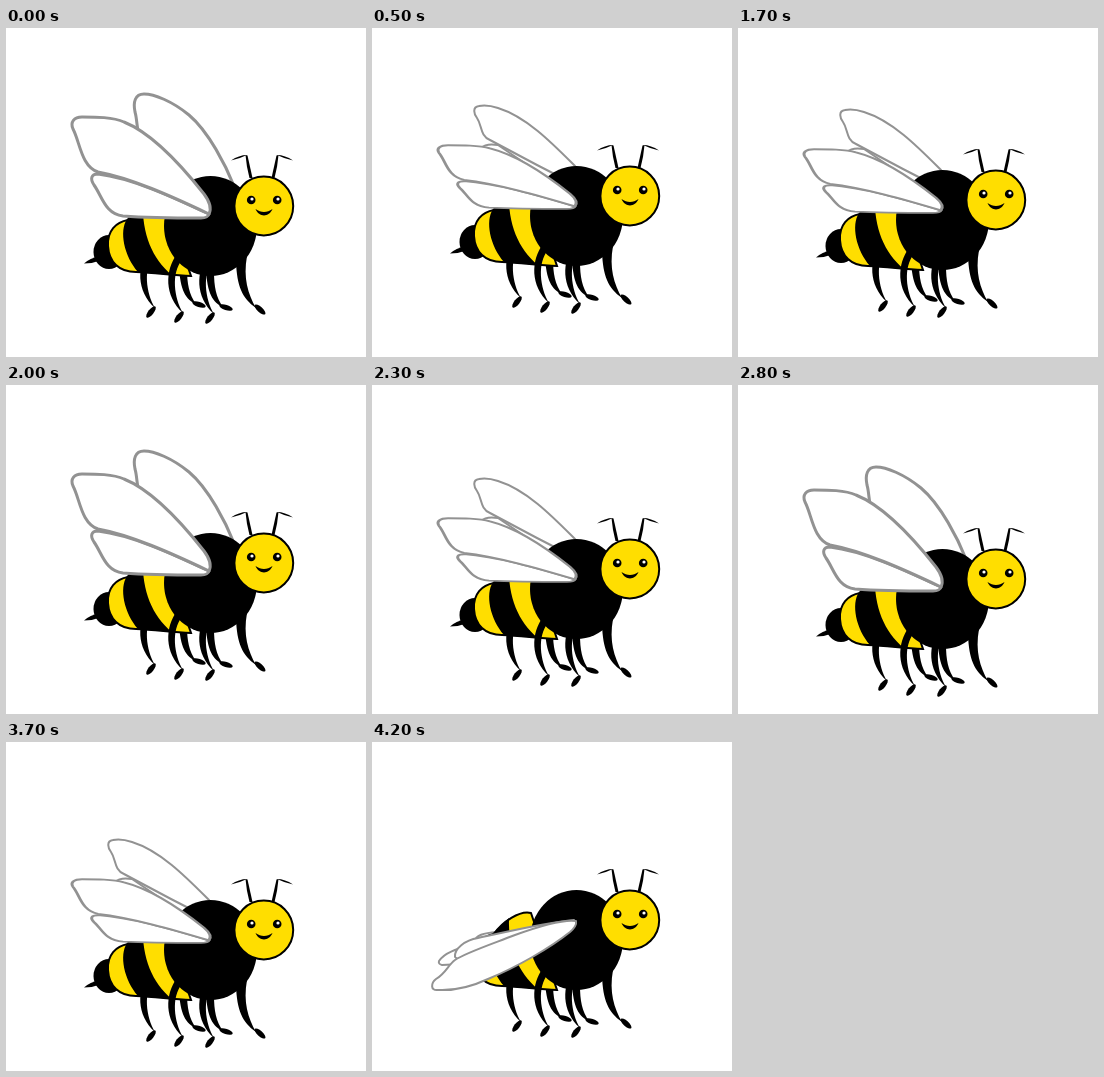
These frames come from a looping animation (360 px wide and 329 px high, 4300 ms). An HTML page without scripts:

```html
<!DOCTYPE html>
<html lang="en">
<head>
<meta charset="utf-8">
<title>Flying bee</title>
<style>
  @property --tick { syntax: "<number>"; inherits: true; initial-value: 0; }

  html, body { margin: 0; width: 100%; height: 100%; overflow: hidden; background: #fff; }
  svg {
    display: block; width: 360px; height: 329px; overflow: hidden;
    animation: count 4.3s steps(43) -1ms infinite;
  }
  @keyframes count { to { --tick: 43; } }

  /* Rise for 10 ticks, sink for 21, rise again: 2px per tick. */
  .bee {
    --y: min(2 * max(10 - var(--tick), var(--tick) - 10) - 20, 84 - 2 * var(--tick));
    transform: translateY(calc(1px * var(--y)));
  }
  /* Raised, level and lowered poses sit 400px apart; the beat lasts 4 ticks. */
  .flap { transform: translateX(calc(400px * (cos(90deg * var(--tick)) - 1))); }

  .yellow { fill: #ffde00; stroke: #000; stroke-width: 2; }
  .wing { fill: #fff; stroke: #929292; stroke-width: 3; stroke-linejoin: round; }
  .thin { stroke-width: 2; }
</style>
</head>
<body>
<svg viewBox="0 0 360 329">
  <defs>
    <g id="front-wings" class="wing">
      <path d="M203 186C165 168 125 150 92 146C85 146 84 151 88 157C96 168 99 186 117 188C145 190 180 190 195 190Q202 190 203 186Z"/>
      <path d="M203 186Q207 178 198 166C172 133 143 104 118 94C107 89 90 89 76 89C68 89 64 94 67 101C74 114 75 138 92 144C125 150 165 168 203 186Z"/>
    </g>
    <g id="near-leg">
      <path d="M171 226C159 242 158 268 177 285C168 270 165 245 176 232Z"/>
      <ellipse rx="7" ry="2.700" transform="translate(173 289) rotate(-52)"/>
    </g>
    <g id="far-leg">
      <path d="M173 238C174 262 180 272 190 276C183 266 181 256 181 240Z"/>
      <ellipse rx="7" ry="2.600" transform="translate(193 276.500) rotate(18)"/>
    </g>
    <g id="feeler">
      <path d="M225 132.500Q233 127 241 127Q234 130.500 225 132.500Z"/>
      <path d="M239.500 127L241.500 127.500L246.500 150L243.500 150Q240.500 139 239.500 127Z"/>
    </g>
    <g id="eye">
      <circle cx="245.200" cy="172" r="4.300"/>
      <circle cx="246" cy="171" r="1.600" fill="#fff"/>
    </g>
  </defs>

  <g class="bee">
    <g class="flap wing">
      <path d="M228 158C220 138 203 104 183 87C166 73 148 66 138 66C129 66 127 74 129 84C133 97 128 118 150 130L200 170Z"/>
      <g class="thin" transform="translate(400)">
        <path d="M109 130Q114 125 126 127L160 150Z"/>
        <path d="M203 148C181 126 155 99 126 90C117 87 112 87 107 88C100 89 102 96 105 100C110 107 108 118 118 122L165 147L200 165Z"/>
      </g>
      <g class="thin" transform="translate(800)">
        <path d="M103 200C103 193 112 191 125 190L160 184L150 200Z"/>
        <path d="M67 219C73 210 85 207 100 203L160 188L110 215C95 221 80 223 70 223Q66 222 67 219Z"/>
      </g>
    </g>

    <use href="#far-leg"/>
    <use href="#far-leg" x="27" y="3"/>

    <g class="body">
      <path d="M93 228.500Q84 230 78 235.500Q87 235.500 96 232Z"/>
      <ellipse cx="103" cy="224" rx="15.500" ry="17"/>
      <path class="yellow" d="M102 218C101 203 110 194 122 192C130 180 148 168 159 171L185 248C165 247 150 245 130 244C113 244 103 234 102 218Z"/>
      <path d="M121 191C113 203 118 228 132 244L166 247C146 231 136 205 137 176Z"/>
      <ellipse cx="204.500" cy="198" rx="46.500" ry="50"/>
    </g>

    <g class="legs">
      <use href="#near-leg" x="-28" y="-5"/>
      <use href="#near-leg"/>
      <use href="#near-leg" x="31" y="1"/>
      <path d="M230 234C231 258 236 270 250 280C242 266 237 250 241 228Z"/>
      <ellipse rx="7" ry="2.700" transform="translate(254 281.500) rotate(42)"/>
    </g>

    <g class="head">
      <use href="#feeler"/>
      <use href="#feeler" transform="matrix(-1 0 0 1 512 0)"/>
      <circle class="yellow" cx="257.800" cy="178" r="29.400"/>
      <use href="#eye"/>
      <use href="#eye" x="26"/>
      <path d="M249.500 181C253 189.500 263 189.500 266.500 181C261 185 255 185 249.500 181Z"/>
    </g>

    <g class="flap">
      <use href="#front-wings"/>
      <use href="#front-wings" transform="translate(400 71.200) scale(1 .63)"/>
      <g class="wing thin" transform="translate(800)">
        <path d="M83 215C82 207 93 198 106 196C135 190 170 181 202 178L110 217C98 219 87 220 83 215Z"/>
        <path d="M204 179C190 177 165 185 143 193C120 202 93 211 83 218C76 223 74 231 64 237C59 241 58 249 66 248C85 249 101 244 116 237C145 225 178 206 198 190Q205 184 204 179Z"/>
      </g>
    </g>
  </g>
</svg>
</body>
</html>
```
